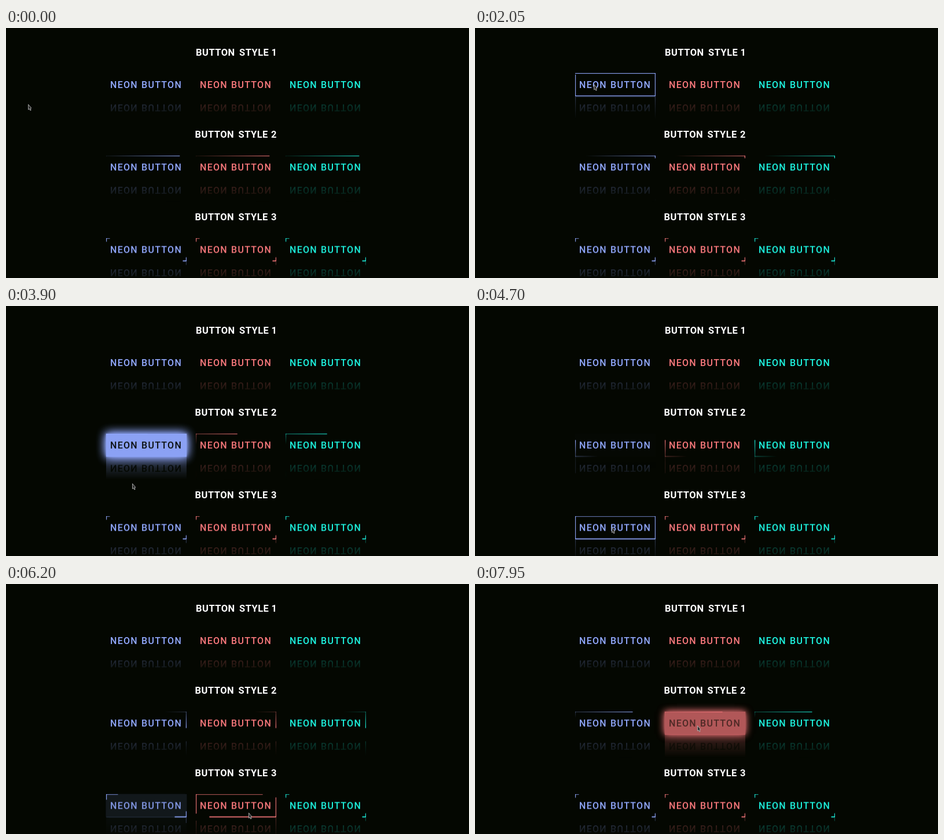
Recreate the animation shown at these times as an HTML page with a canvas. Size 800 by 433 pixels, loop 8000 ms.

```html
<!DOCTYPE html>
<html lang="en">
<head>
<meta charset="utf-8">
<title>Neon buttons</title>
<style>
  html, body { margin: 0; width: 100%; height: 100%; overflow: hidden; background: #040701; }
  canvas { display: block; width: 800px; height: 433px; }
</style>
</head>
<body>
<canvas id="stage" width="800" height="433"></canvas>
<script>
const ctx = document.getElementById('stage').getContext('2d');
const W = 139, H = 40, LINE = 1.2, LOOP = 8000;
const BACK = [4, 7, 1];
const COLORS = [[146, 169, 255], [250, 121, 125], [30, 245, 225]];
const left = col => 173 + 155 * col;
const top_ = row => 78 + 142.8 * row;

// Fill delay and duration for each button style.
const STYLES = [
  { delay: 1000, time: 500 },
  { delay: 0, time: 1000 },
  { delay: 500, time: 500 }
];

// Time, x, y at the turns of the pointer's way.
const PATH = [
  [0, 38, 132], [1000, 165, 37], [1150, 199, 85], [2600, 209, 105], [2650, 209, 120],
  [2900, 214, 243], [3830, 215, 252], [3900, 218, 307], [4250, 235, 372], [4700, 236, 383],
  [5860, 300, 390], [6200, 419, 396], [7200, 420, 372], [7550, 388, 255], [7950, 384, 245]
];

const layer = document.createElement('canvas');
layer.width = W;
layer.height = H;
const g = layer.getContext('2d');

const clamp = v => Math.min(1, Math.max(0, v));
const mix = (a, b, k) => a + (b - a) * k;
const rgba = (c, a = 1) => `rgba(${c.map(Math.round).join()},${a})`;

function pointerAt(t) {
  let i = 1;
  while (i < PATH.length - 1 && PATH[i][0] < t) i++;
  const [t0, x0, y0] = PATH[i - 1], [t1, x1, y1] = PATH[i];
  const k = clamp((t - t0) / (t1 - t0));
  return [mix(x0, x1, k), mix(y0, y1, k)];
}

// When the pointer is over a button; undefined if it never is.
function findHover(row, col) {
  let hover;
  for (let t = 0; t <= LOOP; t += 2) {
    const [x, y] = pointerAt(t);
    const dx = x - left(col), dy = y - top_(row);
    if (dx < 0 || dx > W || dy < 0 || dy > H) continue;
    hover = hover || { enter: t };
    hover.leave = t;
  }
  return hover;
}

const buttons = [];
for (let row = 0; row < 3; row++) {
  for (let col = 0; col < 3; col++) buttons.push({ row, col, hover: findHover(row, col) });
}

// CSS "ease": cubic-bezier(.25, .1, .25, 1).
function ease(x) {
  if (x <= 0) return 0;
  if (x >= 1) return 1;
  const curve = (s, p, q) => 3 * (1 - s) * (1 - s) * s * p + 3 * (1 - s) * s * s * q + s * s * s;
  let lo = 0, hi = 1;
  for (let i = 0; i < 24; i++) {
    const mid = (lo + hi) / 2;
    if (curve(mid, .25, .25) < x) lo = mid; else hi = mid;
  }
  return curve(lo, .1, 1);
}

// Progress of a hover transition, easing back after the pointer leaves.
function progress(hover, t, delay, time) {
  if (!hover || t < hover.enter) return 0;
  const up = ease((Math.min(t, hover.leave) - hover.enter - delay) / time);
  return up * (1 - ease((t - hover.leave) / time));
}

// Draws a word with the left edge of its ink at x.
function word(c, text, x, y, font, spacing) {
  c.font = font;
  c.letterSpacing = spacing + 'px';
  c.fillText(text, x + c.measureText(text).actualBoundingBoxLeft, y);
}

function title(row) {
  const y = top_(row) - 30.4;
  const shift = row ? -1.5 : 0;
  const font = '700 16.5px Roboto, sans-serif';
  ctx.fillStyle = '#fff';
  word(ctx, 'BUTTON', 329 + shift, y, font, .5);
  word(ctx, 'STYLE', 403 + shift, y, font, .5);
  word(ctx, String(row + 1), 459.5 + shift, y, font, 0);
}

// Part of one side, from a to b, measured clockwise around the box.
function edge(side, a, b, color, fade) {
  const len = b - a;
  const box = [
    [a, 0, len, LINE],
    [W - LINE, a, LINE, len],
    [W - b, H - LINE, len, LINE],
    [0, H - b, LINE, len]
  ][side];
  g.fillStyle = rgba(color, .9);
  if (fade) {
    const at = v => [[v, 0], [0, v], [W - v, 0], [0, H - v]][side];
    const grad = g.createLinearGradient(...at(a), ...at(b));
    grad.addColorStop(0, rgba(color, 0));
    grad.addColorStop(1, rgba(color));
    g.fillStyle = grad;
  }
  g.fillRect(...box);
}

const sideLength = side => side % 2 ? H : W;

// Sides drawn one after another.
function drawnBorder(hover, t, color) {
  for (let s = 0; s < 4; s++) {
    const len = sideLength(s) * progress(hover, t, s * 250, 250);
    if (len > 0) edge(s, 0, len, color);
  }
}

// A streak chasing around the box once a second.
function runningBorder(t, color) {
  for (let s = 0; s < 4; s++) {
    const u = (t / 1000 + 1.228 - s / 4) % 1;
    if (u >= .5) continue;
    const full = sideLength(s);
    const start = (4 * u - 1) * full;
    edge(s, start, start + full, color, true);
  }
}

// Two corner brackets that grow into a frame.
function cornerBorder(hover, t, color) {
  const k = progress(hover, t, 0, 500);
  for (let s = 0; s < 4; s++) {
    const full = sideLength(s);
    const len = mix(6.5, full, k);
    if (s % 2) edge(s, full - len, full, color);
    else edge(s, 0, len, color);
  }
}

function glow(x, y, color, k) {
  ctx.save();
  ctx.beginPath();
  ctx.rect(0, 0, 800, 433);
  ctx.rect(x, y, W, H);
  ctx.clip('evenodd');
  ctx.fillStyle = '#000';
  ctx.shadowColor = rgba(color, k);
  ctx.shadowOffsetX = 2000;
  for (const blur of [4, 18, 18]) {
    ctx.shadowBlur = blur * k;
    ctx.fillRect(x - 2000, y, W, H);
  }
  ctx.restore();
}

function reflect(x, y) {
  const mask = g.createLinearGradient(0, 0, 0, H);
  mask.addColorStop(0, 'rgba(0,0,0,0)');
  mask.addColorStop(1, 'rgba(0,0,0,.333)');
  g.globalCompositeOperation = 'destination-in';
  g.fillStyle = mask;
  g.fillRect(0, 0, W, H);
  g.globalCompositeOperation = 'source-over';
  ctx.save();
  ctx.translate(x, y + 2 * H + .4);
  ctx.scale(1, -1);
  ctx.drawImage(layer, 0, 0);
  ctx.restore();
}

function drawButton({ row, col, hover }, t) {
  const x = left(col), y = top_(row), color = COLORS[col];
  const k = progress(hover, t, STYLES[row].delay, STYLES[row].time);

  g.clearRect(0, 0, W, H);
  if (k > 0) {
    glow(x, y, color, k);
    g.fillStyle = rgba(color, k);
    g.fillRect(0, 0, W, H);
  }
  g.fillStyle = rgba(color.map((v, i) => mix(v, BACK[i], k)));
  const font = '500 16px Roboto, sans-serif';
  word(g, 'NEON', 8, 25.7, font, 1.3);
  word(g, 'BUTTON', 62, 25.7, font, 1.3);

  if (row === 0) drawnBorder(hover, t, color);
  else if (row === 1) runningBorder(t, color);
  else cornerBorder(hover, t, color);

  ctx.drawImage(layer, x, y);
  reflect(x, y);
}

function drawPointer(t) {
  const [x, y] = pointerAt(t);
  ctx.save();
  ctx.translate(x + .5, y + .5);
  ctx.beginPath();
  ctx.moveTo(0, 0);
  for (const p of [[0, 9], [1.8, 7.5], [3.2, 10.4], [4.6, 9.8], [3.4, 6.9], [5.3, 6.4]]) ctx.lineTo(...p);
  ctx.closePath();
  ctx.fillStyle = '#2a2a2a';
  ctx.strokeStyle = '#b4b4b4';
  ctx.lineWidth = .9;
  ctx.fill();
  ctx.stroke();
  ctx.restore();
}

function draw(t) {
  ctx.fillStyle = rgba(BACK);
  ctx.fillRect(0, 0, 800, 433);
  for (const b of buttons) drawButton(b, t);
  for (let row = 0; row < 3; row++) title(row);
  drawPointer(t);
}

const began = performance.now();
function tick() {
  draw((performance.now() - began) % LOOP);
  requestAnimationFrame(tick);
}
tick();
</script>
</body>
</html>
```
